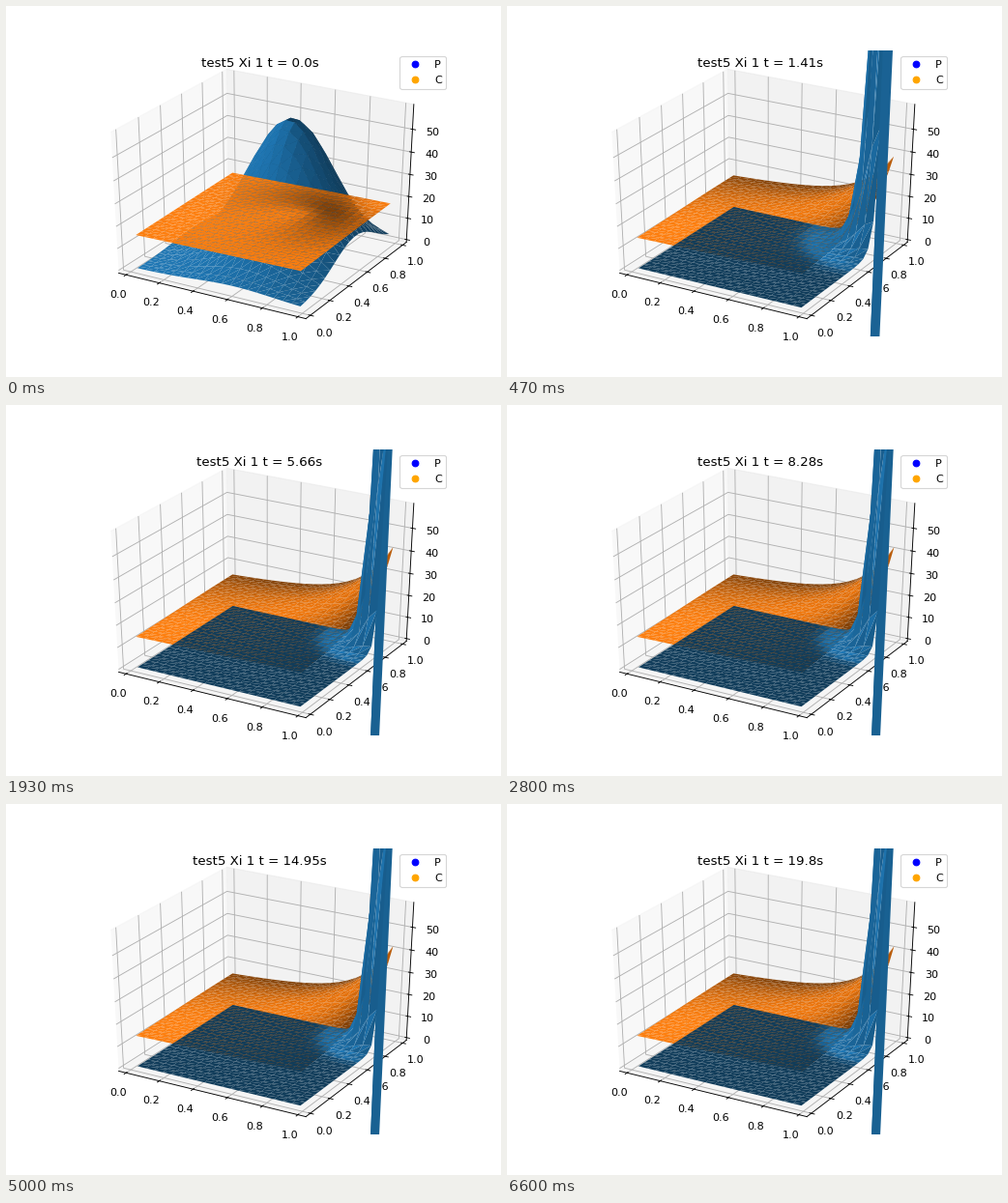
These frames come from a looping animation (512 by 384 pixels, 6.67 s). A matplotlib script:

```python
import numpy as np
import matplotlib.pyplot as plt
from matplotlib.animation import FuncAnimation
from matplotlib.colors import to_rgb
from matplotlib.lines import Line2D
from mpl_toolkits.mplot3d.art3d import Poly3DCollection

FRAMES, LOOP_MS, T_END = 100, 6670, 20
CELLS = 20
Z_MAX = 59.5
T_EDGE = 0.606  # time at which the hill has reached the corner


def cell_centre_mesh(n):
    """Cell centres and counter-clockwise triangles split along x = y."""
    grid = np.linspace(0, 1, n)
    x, y = (a.ravel() for a in np.meshgrid(grid, grid))
    i, j = (a.ravel() for a in np.meshgrid(range(n - 1), range(n - 1)))
    a = j * n + i
    b, c, d = a + 1, a + n + 1, a + n
    return x, y, np.concatenate([np.c_[a, b, c], np.c_[a, c, d]])


# X and Y run over 0..1 between the outermost cell centres.
X, Y, TRIS = cell_centre_mesh(CELLS)
FIRST, SPAN = 0.5 / CELLS, 1 - 1 / CELLS
HILL = np.exp(-((X - 0.6) ** 2 + (Y - 0.6) ** 2) / 0.1126)
CORNER_R = np.hypot(1 - X, 1 - Y)
LIGHT = np.array([-2, -2, 1]) / 3


def mix_log(a, b, w):
    return a ** (1 - w) * b**w


def sigmoid(x):
    return 1 / (1 + np.exp(-x))


def edge_hill():
    def profile(s):
        d = 1 - s
        return np.exp(-2.6 * np.hypot(d - 0.08, 0.03) - 1.8 * d**2)

    base = 2.2 + 1.8 * (X + Y) - 3 * X * Y
    return base + 135 * profile(X) * profile(Y)


def density(t):
    if t < T_EDGE:
        w = t / T_EDGE
        swell = np.exp(0.5 * np.sin(np.pi * w))
        return swell * mix_log(Z_MAX * HILL, edge_hill(), w)
    age = t - T_EDGE
    rate = 33 - 20 * np.exp(-1.3 * age)
    spike = 0.05 + 3400 * np.exp(-rate * CORNER_R)
    return mix_log(edge_hill(), spike, 1 - np.exp(-4 * age))


def chemical(t):
    start = 15.3 + 1.1 * (X + Y) + 0.8 * HILL * np.exp(-6 * t)
    final = 12.6 + 8.9 * np.exp(-1.3 * CORNER_R)
    tip = 21 * np.exp(-6 * CORNER_R)
    w = sigmoid(5 * (t - 0.7))
    return (1 - w) * start + w * final + sigmoid(6 * (t - 1.15)) * tip


def shade(verts, color):
    """Light each face, stretched over half to full brightness."""
    normals = np.cross(verts[:, 0] - verts[:, 1], verts[:, 1] - verts[:, 2])
    lit = normals @ LIGHT / np.linalg.norm(normals, axis=1)
    lit = (lit - lit.min()) / max(np.ptp(lit), 1e-9)
    return (0.5 + 0.5 * lit)[:, None] * np.array(to_rgb(color))


def surface(z):
    return np.stack([FIRST + SPAN * X, FIRST + SPAN * Y, z], axis=1)[TRIS]


def padded(lo, hi, margin=0.0):
    pad = (hi - lo) * margin
    lo, hi = lo - pad, hi + pad
    rim = (hi - lo) / 48
    return lo - rim, hi + rim


fig = plt.figure(figsize=(6.4, 4.8), dpi=80)
ax = fig.add_subplot(projection="3d")
ax.apply_aspect = lambda position=None: None  # fill the whole subplot area
ax.view_init(30, -60)
ax.set_box_aspect((1, 1, 1), zoom=np.sqrt(3) / 1.8294640721620434)
ax.set_xlim3d(*padded(FIRST, FIRST + SPAN, 0.05))
ax.set_ylim3d(*padded(FIRST, FIRST + SPAN, 0.05))
ax.set_zlim3d(*padded(0, Z_MAX))
ax.set_xticks(np.arange(6) / 5)
ax.set_yticks(np.arange(6) / 5)
ax.set_zticks(range(0, 51, 10))

layers = []
for field, color in ((density, "C0"), (chemical, "C1")):
    verts = surface(field(0))
    poly = Poly3DCollection(verts, facecolors=shade(verts, color), linewidths=0)
    ax.add_collection3d(poly)
    layers.append((poly, field, color))

dots = [Line2D([0], [0], linestyle="none", marker="o", color=c)
        for c in ("blue", "orange")]
ax.legend(dots, ["P", "C"], numpoints=1, loc="upper right")
title = ax.set_title("", y=1.0)


def update(frame):
    t = T_END * frame / (FRAMES - 1)
    for poly, field, color in layers:
        verts = surface(field(t))
        poly.set_verts(verts)
        poly.set_facecolor(shade(verts, color))
    title.set_text(f"test5 Xi 1 t = {round(t, 2)}s")
    return [title] + [layer[0] for layer in layers]


anim = FuncAnimation(fig, update, frames=FRAMES, interval=LOOP_MS / FRAMES,
                     repeat=True, repeat_delay=0, blit=False)
plt.show()
```
